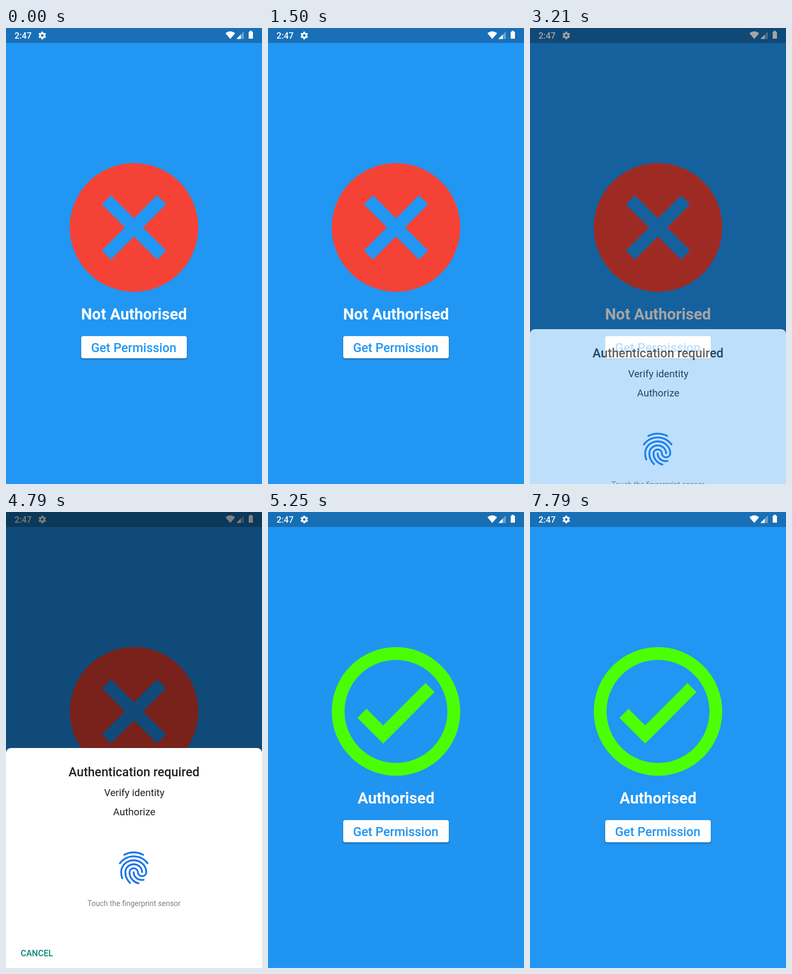
An HTML page that plays this animation: 480x854 px, repeating every 8 s.

```html
<!DOCTYPE html>
<html lang="en">
<head>
<meta charset="utf-8">
<title>Authorisation</title>
<style>
html, body { margin: 0; width: 100%; height: 100%; overflow: hidden; background: #2196f3; }
svg { display: block; width: 480px; height: 854px; font-family: Roboto, sans-serif; }
.mid { text-anchor: middle; }
.medium { font-weight: 500; }
.bold { font-weight: 700; font-size: 29.2px; fill: #fff; }
#button { filter: drop-shadow(0 2px 1.5px rgba(0, 0, 0, .3)); }
</style>
</head>
<body>
<svg viewBox="0 0 480 854">
  <rect width="480" height="854" fill="#2196f3"/>

  <rect width="480" height="28" fill="#1970b6"/>
  <g fill="#fff">
    <text class="medium" x="16" y="20" font-size="16.3">2:47</text>
    <g transform="translate(68 14)">
      <circle r="4" fill="none" stroke="#fff" stroke-width="3.2"/>
      <path d="M0-7.2V-4M0 7.2V4M6.2-3.6 3.5-2M-6.2 3.6-3.5 2M6.2 3.6 3.5 2M-6.2-3.6-3.5-2" stroke="#fff" stroke-width="3.4"/>
    </g>
    <path d="M411.5 10Q420.5 2.5 429.5 10L420.5 20.5Z"/>
    <path d="M446 6.5V20.5H432Z" opacity=".35"/>
    <path d="M440 12.5V20.5H432Z"/>
    <path d="M457 7V5.3H461V7H463V20H455V7Z"/>
  </g>

  <g id="denied">
    <g transform="translate(95.4 228.9) scale(12.05)">
      <circle cx="12" cy="12" r="10" fill="#f44336"/>
      <path fill="#2196f3" d="M17 15.59 15.59 17 12 13.41 8.41 17 7 15.59 10.59 12 7 8.41 8.41 7 12 10.59 15.59 7 17 8.41 13.41 12Z"/>
    </g>
    <text class="mid bold" x="240" y="546">Not Authorised</text>
  </g>
  <g id="granted">
    <g transform="translate(95.4 228.9) scale(12.05)">
      <circle cx="12" cy="12" r="9" fill="none" stroke="#4cff05" stroke-width="2"/>
      <path fill="#4cff05" d="M16.59 7.58 10 14.17 7.41 11.59 6 13l4 4 8-8Z"/>
    </g>
    <text class="mid bold" x="240" y="546">Authorised</text>
  </g>

  <rect id="button" x="141" y="577" width="198" height="41.5" rx="4" fill="#fff"/>
  <text class="mid medium" x="239.5" y="607" font-size="23.35" fill="#2196f3">Get Permission</text>

  <!-- Dimmer and sheet fade together as one layer. -->
  <g id="dialog">
    <rect width="480" height="854" opacity=".5"/>
    <g id="sheet">
      <rect y="442" width="480" height="840" rx="9" fill="#fff"/>
      <g class="mid" fill="#212121">
        <text class="medium" x="240" y="495" font-size="23.35">Authentication required</text>
        <text x="240.5" y="532" font-size="18.68">Verify identity</text>
        <text x="240.5" y="568" font-size="18.68">Authorize</text>
        <text x="240" y="738" font-size="14" fill="#808080">Touch the fingerprint sensor</text>
      </g>
      <g transform="translate(202.9 629.9) scale(3.05)" fill="none" stroke="#1a73e8" stroke-width="1.1" stroke-linecap="round">
        <path d="M6.2 3.97C7.95 3 9.9 2.5 12 2.5S15.9 2.95 17.8 3.97"/>
        <path d="M3.5 9.22C4.45 7.9 5.62 6.83 7.06 6.1 10.1 4.53 13.9 4.53 16.92 6.09 18.36 6.83 19.55 7.88 20.49 9.19"/>
        <path d="M9.75 21.29C8.9 20.45 8.5 19.95 7.83 18.7 7.17 17.55 6.84 16.14 6.84 14.66 6.84 11.97 9.15 9.77 12 9.77S17.16 11.97 17.16 14.66"/>
        <path d="M11.94 14.66c0 1.57.8 3.06 2.16 3.97.78.53 1.72.81 2.82.81.3 0 .72-.03 1.13-.1"/>
        <path d="M14.91 21.5C13.4 21.1 12.4 20.5 11.41 19.52 10.1 18.23 9.39 16.5 9.39 14.66c0-1.34 1.16-2.44 2.58-2.44s2.58 1.1 2.58 2.44 1.16 2.44 2.58 2.44 2.58-1.1 2.58-2.44c0-4.04-3.47-7.33-7.75-7.33-3.04 0-5.81 1.69-7.06 4.31-.42.88-.64 1.91-.64 3.02 0 .83.07 2.11.7 3.79"/>
      </g>
      <text class="medium" x="27.5" y="832" font-size="16" fill="#008577">CANCEL</text>
    </g>
  </g>
</svg>
<script>
const LOOP = 8000, SHOW = 3124, HIDE = 4950, GRANT = 5130, TRAVEL = 409;
const [denied, granted, dialog, sheet] =
  ["denied", "granted", "dialog", "sheet"].map(id => document.getElementById(id));

// Decelerating curve, cubic-bezier(0, 0, .2, 1).
function slowIn(x) {
  if (x <= 0) return 0;
  if (x >= 1) return 1;
  let lo = 0, hi = 1;
  for (let i = 0; i < 20; i++) {
    const s = (lo + hi) / 2;
    if (0.6 * s * s * (1 - s) + s ** 3 < x) lo = s; else hi = s;
  }
  return lo * lo * (3 - 2 * lo);
}

function draw(t) {
  const open = slowIn((t - SHOW) / 250) - slowIn((t - HIDE) / 350);
  dialog.setAttribute("opacity", open);
  sheet.setAttribute("transform", `translate(0 ${TRAVEL * (1 - open)})`);
  denied.style.display = t < GRANT ? "" : "none";
  granted.style.display = t < GRANT ? "none" : "";
}

const start = performance.now();
function tick() {
  draw((performance.now() - start) % LOOP);
  requestAnimationFrame(tick);
}
draw(0);
tick();
</script>
</body>
</html>
```
